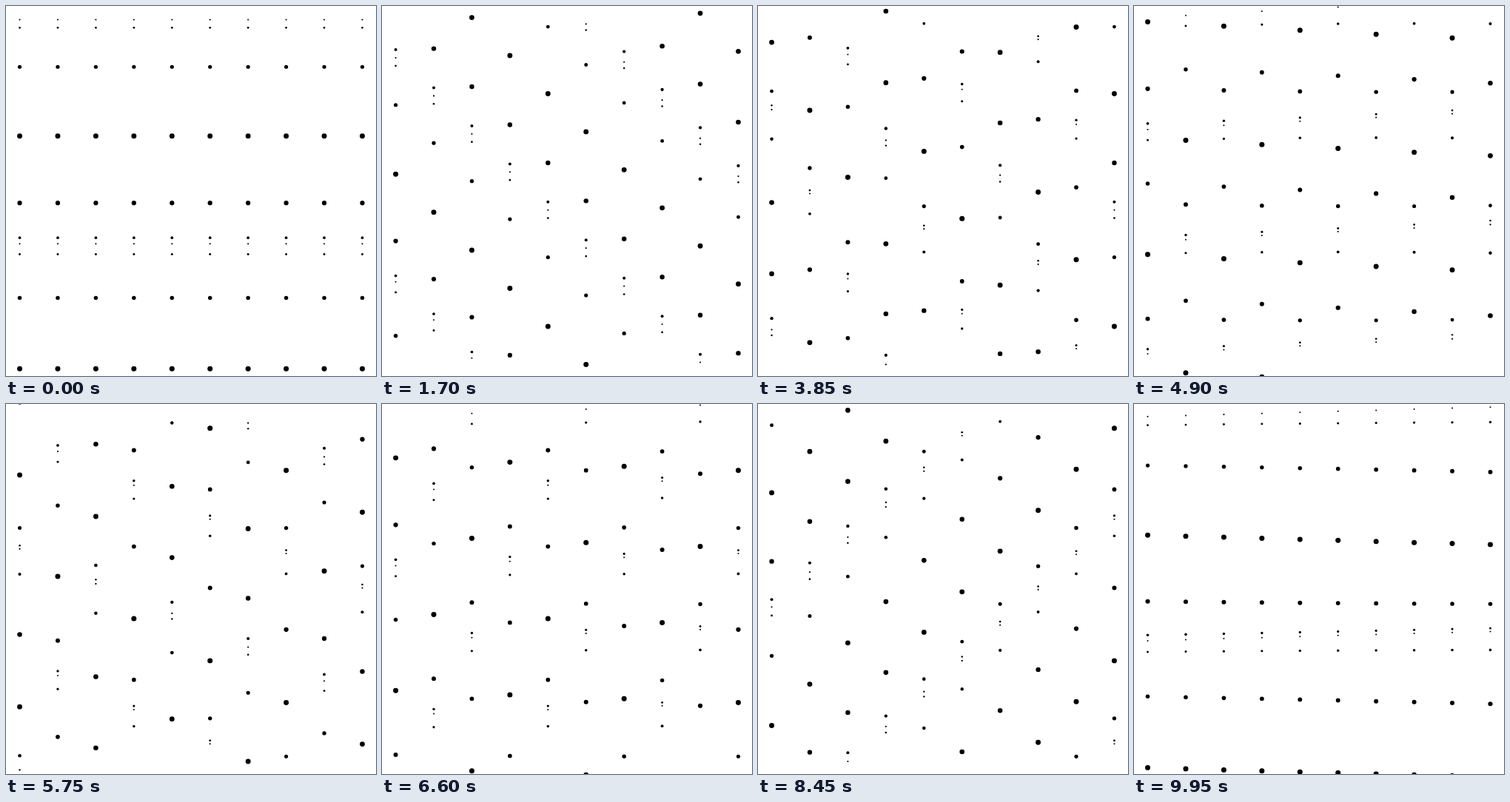
Write an HTML page with a canvas that moves like this. It is 500 px wide and 500 px high and loops after 10000 ms.

```html
<!DOCTYPE html>
<html lang="en">
<head>
<meta charset="utf-8">
<title>Dot wave</title>
<style>
  html, body { margin: 0; width: 100%; height: 100%; overflow: hidden; background: #fff; }
  canvas { display: block; }
</style>
</head>
<body>
<canvas id="stage" width="500" height="500"></canvas>
<script>
const ctx = document.getElementById('stage').getContext('2d');
const LOOP = 10000, STEP = 50;
const COUNT = 10, MARGIN = 18.5, GAP = 463 / 9;
const SWING = GAP * 0.9;               // vertical travel of each dot
const ROW_PHASE = Math.PI * 0.34;
const SIZE_LAG = 0.3;                  // size trails the vertical swing

function draw(now) {
  const time = Math.floor(now % LOOP / STEP) * STEP;
  const turn = 2 * Math.PI * time / LOOP;
  ctx.fillStyle = '#fff';
  ctx.fillRect(0, 0, 500, 500);
  ctx.fillStyle = '#000';
  for (let col = 0; col < COUNT; col++) {
    for (let row = 0; row < COUNT; row++) {
      // each column turns a whole number of times per loop
      const phase = row * ROW_PHASE - (col + 1) * turn;
      const x = MARGIN + col * GAP;
      const y = MARGIN + row * GAP - SWING * Math.sin(phase);
      const radius = 2.25 - 1.25 * Math.cos(phase - SIZE_LAG);
      ctx.beginPath();
      ctx.arc(x, y, radius, 0, 2 * Math.PI);
      ctx.fill();
    }
  }
}

function tick() {
  draw(performance.now());
  requestAnimationFrame(tick);
}
tick();
</script>
</body>
</html>
```
